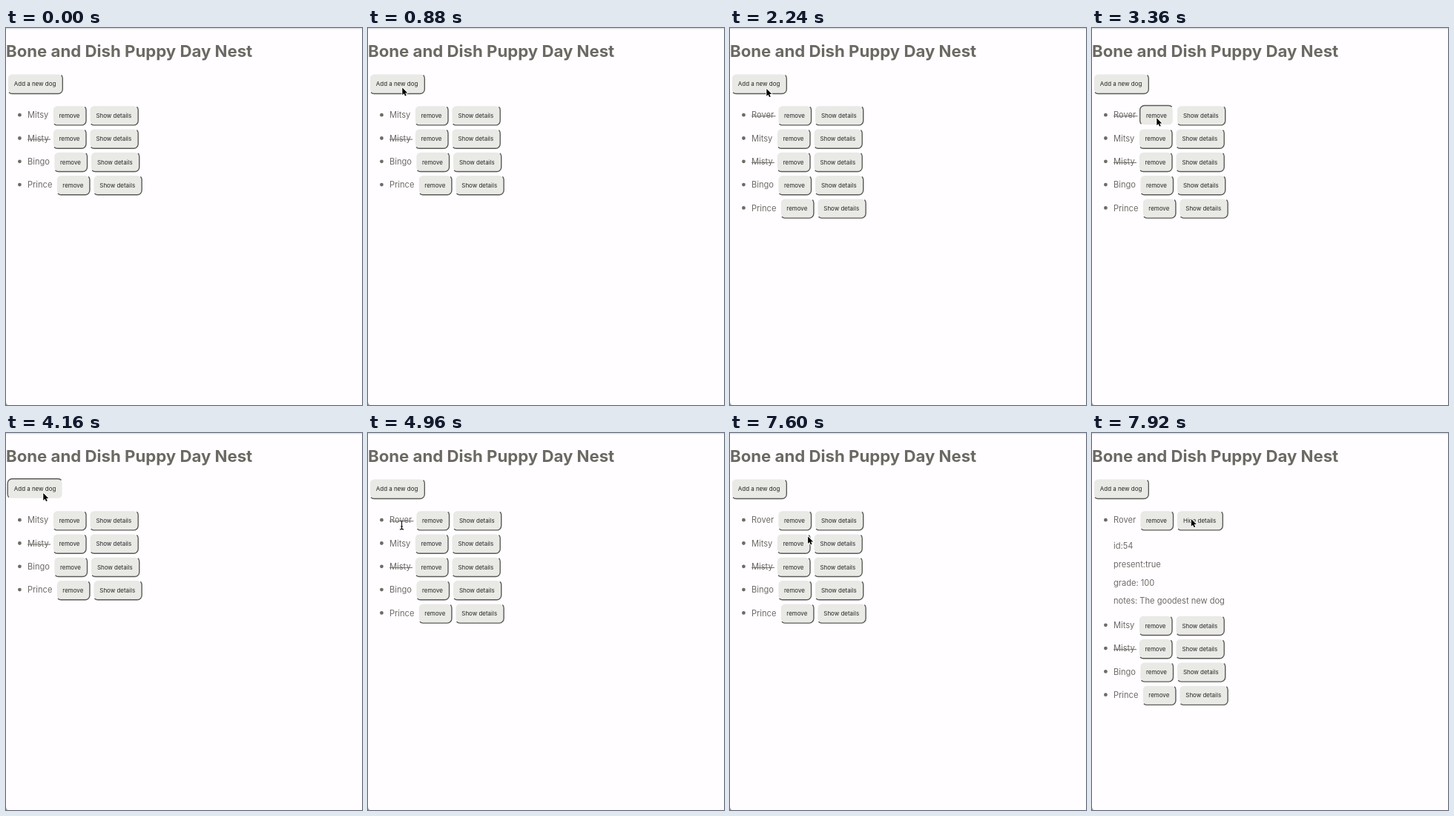
Write an HTML page with a canvas that moves like this. It is 480 px wide and 508 px high and loops after 8 s.

```html
<!DOCTYPE html>
<html lang="en">
<head>
<meta charset="utf-8">
<title>Dog day list</title>
<style>
  html, body { margin: 0; width: 100%; height: 100%; overflow: hidden; background: #fffdff; }
  canvas { display: block; width: 480px; height: 508px; }
</style>
</head>
<body>
<canvas id="stage" width="480" height="508"></canvas>
<script>
const ctx = document.getElementById('stage').getContext('2d');
const LOOP = 8000, STEP = 80;
const FONT = 'Inter, "Open Sans", sans-serif';
const INK = '#6e6b66', EDGE = '#595956', FACE = '#e9e9e5';
const ROW_TOP = 117.7, ROW_PITCH = 31.3, DETAILS_HEIGHT = 110.3;

// Pointer stops: time, x, y
const STOPS = [
  [240, 454, 209], [880, 45, 79],
  [2160, 45, 79], [2240, 48, 80.5], [2320, 48, 83.5],
  [2480, 48, 83.5], [3040, 86, 120],
  [3520, 86, 120], [3920, 49, 79.5],
  [4320, 49, 79.5], [4720, 46, 129], [4800, 45.5, 124],
  [5520, 45.5, 124], [5760, 61, 118], [5920, 57, 118],
  [6000, 57, 118], [6240, 52, 150], [6480, 51, 181],
  [7360, 51, 181], [7760, 132.5, 114.5]
];

const during = (t, from, to) => t >= from && t < to;

function text(str, x, y, size, { color = INK, weight = 400, align = 'left' } = {}) {
  ctx.font = `${weight} ${size}px ${FONT}`;
  ctx.fillStyle = color;
  ctx.textAlign = align;
  ctx.fillText(str, x, y);
}

function button(label, x, y, w, h, pressed) {
  const b = 1.4, r = 6;
  ctx.fillStyle = FACE;
  ctx.beginPath();
  ctx.roundRect(x + b, y + b, w - 2 * b, h - 2 * b, r - b / 2);
  ctx.fill();

  // Two shaded sides, ending halfway round the opposite corners
  const left = x + b / 2 + r, top = y + b / 2 + r;
  const right = x + w - b / 2 - r, bottom = y + h - b / 2 - r;
  const q = Math.PI / 4;
  ctx.beginPath();
  if (pressed) {
    ctx.arc(left, bottom, r, 3 * q, 4 * q);
    ctx.arc(left, top, r, 4 * q, 6 * q);
    ctx.arc(right, top, r, 6 * q, 7 * q);
  } else {
    ctx.arc(right, top, r, -q, 0);
    ctx.arc(right, bottom, r, 0, 2 * q);
    ctx.arc(left, bottom, r, 2 * q, 3 * q);
  }
  ctx.strokeStyle = EDGE;
  ctx.lineWidth = b;
  ctx.stroke();
  text(label, x + w / 2 - 0.2, y + h / 2 + 3.2, 7.95, { color: '#242424', align: 'center' });
}

function dogRow(dog, y) {
  ctx.fillStyle = INK;
  ctx.beginPath();
  ctx.arc(18.4, y - 0.5, 2.4, 0, 7);
  ctx.fill();
  text(dog.name, 29, y + 3.7, 11.1);
  if (dog.away) ctx.fillRect(29, y + 0.6, dog.x - 31.5, 1);

  button('remove', dog.x, y - 13.9, 46.2, 27.8, dog.removing);
  const label = dog.open ? 'Hide details' : 'Show details';
  button(label, dog.x + 49.6, y - 13.9, dog.open ? 63.4 : 66.8, 27.8, dog.toggling);

  if (dog.open) {
    ['id:54', 'present:true', 'grade: 100', 'notes: The goodest new dog']
      .forEach((line, i) => text(line, 29, y + 38.5 + i * 24.7, 11.1));
  }
}

function dogsAt(t) {
  const dogs = [
    { name: 'Mitsy', x: 62.5 },
    { name: 'Misty', x: 62.5, away: !during(t, 6640, 7200) },
    { name: 'Bingo', x: 64 },
    { name: 'Prince', x: 67.4 }
  ];
  if (during(t, 1680, 3440) || t >= 4240) {
    dogs.unshift({
      name: 'Rover', x: 64,
      away: t < 3440 || during(t, 4960, 5440),
      removing: during(t, 3360, 3440),
      toggling: during(t, 7840, 7920),
      open: t >= 7920
    });
  }
  return dogs;
}

function pointerAt(t) {
  const i = STOPS.findIndex(s => s[0] > t);
  if (i === 0) return STOPS[0].slice(1);
  if (i < 0) return STOPS[STOPS.length - 1].slice(1);
  const [t0, x0, y0] = STOPS[i - 1], [t1, x1, y1] = STOPS[i];
  const k = (t - t0) / (t1 - t0), e = k * k * (3 - 2 * k);
  return [x0 + (x1 - x0) * e, y0 + (y1 - y0) * e];
}

function outlined(path, ink, halo) {
  ctx.strokeStyle = '#fff';
  ctx.lineWidth = halo;
  ctx.stroke(path);
  if (ink) {
    ctx.strokeStyle = '#111';
    ctx.lineWidth = ink;
    ctx.stroke(path);
  } else {
    ctx.fillStyle = '#000';
    ctx.fill(path);
  }
}

const arrow = new Path2D('M1.3 1.5V11.2L3.5 9.2 5 12.6 6.7 11.9 5.2 8.5H8.3Z');
const beam = new Path2D('M-2.7-6Q0-6 0-4Q0-6 2.7-6M0-4V4M-2.7 6Q0 6 0 4Q0 6 2.7 6M-1.5 2H1.5');

function pointer(t) {
  if (t < 160) return;
  const [x, y] = pointerAt(t);
  const overName = x >= 29 && x < 60 && y > 108;
  ctx.save();
  ctx.translate(x, y);
  ctx.lineJoin = 'round';
  if (overName) outlined(beam, 1.1, 2.2);
  else outlined(arrow, 0, 1.8);
  ctx.restore();
}

function draw(t) {
  ctx.fillStyle = '#fffdff';
  ctx.fillRect(0, 0, 480, 508);
  ctx.fillStyle = '#dddce1';
  ctx.fillRect(0, 0, 480, 1.4);
  ctx.fillStyle = '#8b8b8b';
  ctx.beginPath();
  ctx.moveTo(0, 503);
  ctx.quadraticCurveTo(0, 508, 3, 508);
  ctx.lineTo(0, 508);
  ctx.fill();

  text('Bone and Dish Puppy Day Nest', 0, 38.5, 22.2, { color: '#6c6963', weight: 700 });
  button('Add a new dog', 1.5, 61, 75.5, 28.2, during(t, 1600, 1680) || during(t, 4160, 4240));

  let y = ROW_TOP;
  for (const dog of dogsAt(t)) {
    dogRow(dog, y);
    y += ROW_PITCH + (dog.open ? DETAILS_HEIGHT : 0);
  }
  pointer(t);
}

const start = performance.now();
function tick() {
  const t = (performance.now() - start) % LOOP;
  draw(Math.floor(t / STEP) * STEP);
  requestAnimationFrame(tick);
}
tick();
</script>
</body>
</html>
```
